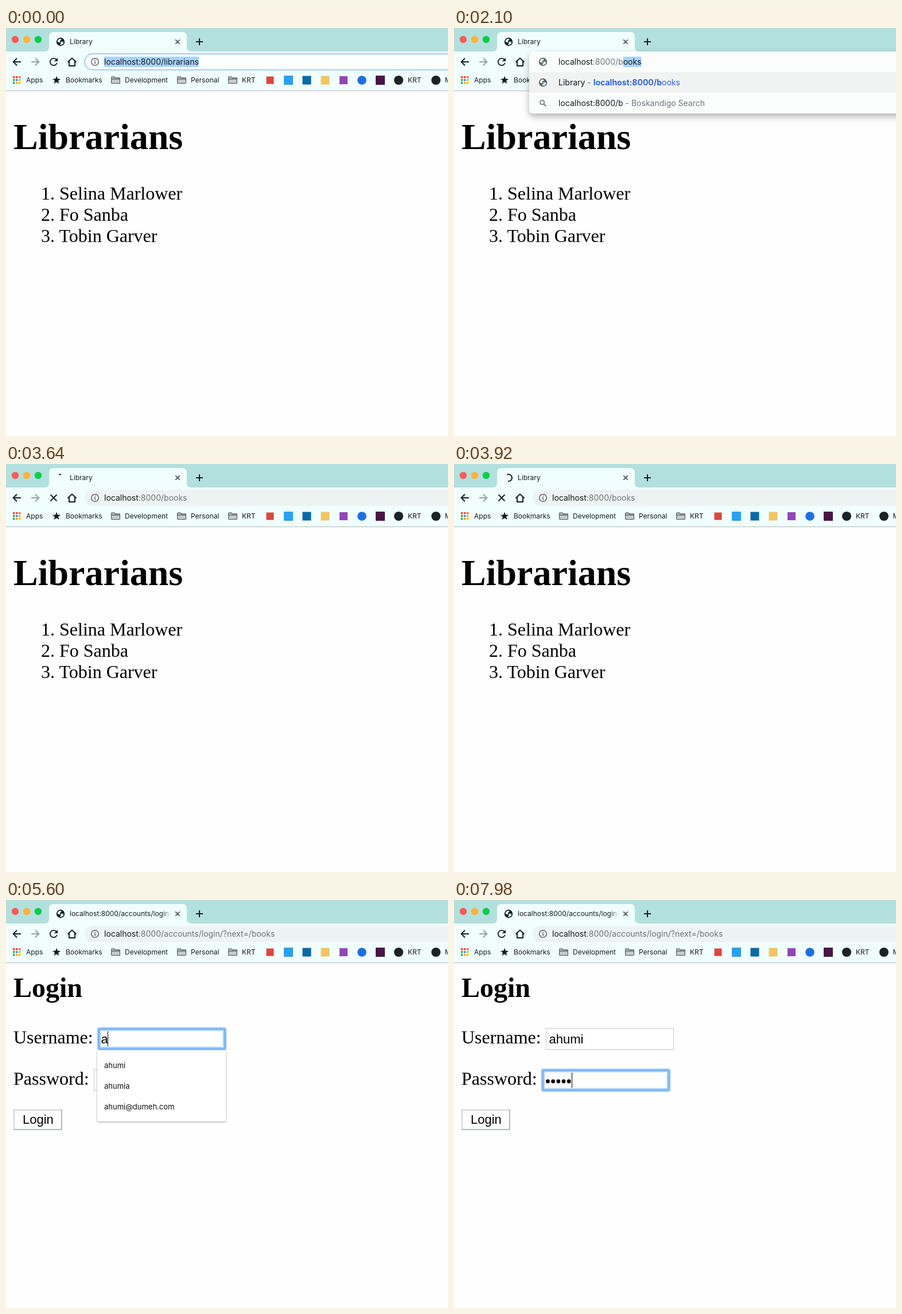
Write an HTML page that moves like this. It is 770 px wide and 711 px high and loops after 8 s.

```html
<!DOCTYPE html>
<html lang="en">
<head>
<meta charset="utf-8">
<title>Library</title>
<style>
  html, body { margin: 0; width: 100%; height: 100%; overflow: hidden; background: #fefefe; }
  svg { display: block; width: 770px; height: 711px; }
  text { white-space: pre; font-family: Inter, Roboto, sans-serif; font-size: 14px; fill: #111a1c; }
  .small { font-size: 12px; }
  .list { font: 32px "Liberation Serif", serif; fill: #000; }
  .head { font: bold 64px "Liberation Serif", serif; fill: #000; }
  .form { font: 22px "Liberation Sans", sans-serif; fill: #000; }
  .hint { font-size: 13px; fill: #111; }
  .dim { fill: #6c7478; }
  .link { fill: #2c64e0; }
  .bold { font-weight: 700; }
  .menu { filter: drop-shadow(0 5px 6px rgba(0, 0, 0, .3)); }
  .popup { filter: drop-shadow(0 1px 1.5px rgba(0, 0, 0, .4)); }
</style>
</head>
<body>
<svg viewBox="0 0 770 711">
  <defs>
    <linearGradient id="fade">
      <stop offset="0" stop-color="#f0fffe" stop-opacity="0"/>
      <stop offset="1" stop-color="#f0fffe"/>
    </linearGradient>
    <clipPath id="tabClip"><rect x="108" y="8" width="178" height="30"/></clipPath>
    <g id="globe">
      <circle r="7.2"/>
      <path d="M-5.4 -.6C-5 -3.4 -2.8 -5.2 -.4 -5.4L1.8 -4.6L.6 -2.4L-1.6 -1.6L-.6 .4L-2.6 1.6ZM.4 .6L3 -.6L5.4 .8C5 3.4 3 5 .6 5.4L-1.4 4L.8 2.6Z" fill="#f4fdfd"/>
    </g>
    <path id="arrow" d="M7 0H-6M0-6.3L-6.3 0L0 6.3" fill="none" stroke-width="2"/>
    <path id="reload" transform="scale(.88) translate(-12 -12)" d="M17.65 6.35C16.2 4.9 14.21 4 12 4c-4.42 0-7.99 3.58-7.99 8s3.57 8 7.99 8c3.73 0 6.84-2.55 7.73-6h-2.08c-.82 2.33-3.04 4-5.65 4-3.31 0-6-2.69-6-6s2.69-6 6-6c1.66 0 3.14.69 4.22 1.78L13 11h7V4l-2.35 2.35z"/>
    <path id="folder" d="M.6 1.6Q.6.6 1.6.6H5.8L7.4 2.4H14.4Q15.4 2.4 15.4 3.4V11Q15.4 12 14.4 12H1.6Q.6 12 .6 11ZM.6 4.4H15.4" fill="#c5caca" stroke="#4c5456" stroke-width="1.1"/>
  </defs>
  <g id="chrome"></g>
  <g id="live"></g>
</svg>
<script>
const LOOP = 8000;
const HOST = "localhost", PORT = ":8000/", WORD = "books";
const USER = "ahumi";
const INK = "#0b2226";
const SELECT = "#a9d3fd";

const rect = (x, y, w, h, fill, more = "") =>
  `<rect x="${x}" y="${y}" width="${w}" height="${h}" fill="${fill}" ${more}/>`;
const circle = (x, y, r, fill, more = "") =>
  `<circle cx="${x}" cy="${y}" r="${r}" fill="${fill}" ${more}/>`;
const line = (d, color, width) =>
  `<path d="${d}" fill="none" stroke="${color}" stroke-width="${width}"/>`;
const text = (x, y, body, cls = "") => `<text x="${x}" y="${y}" class="${cls}">${body}</text>`;
const span = (body, cls) => `<tspan class="${cls}">${body}</tspan>`;
const icon = (id, x, y, color, more = "") =>
  `<use href="#${id}" transform="translate(${x} ${y}) ${more}" fill="${color}" stroke="${id === "arrow" ? color : "none"}"/>`;
const folder = x => `<use href="#folder" x="${x}" y="84.5"/>`;
const cross = (x, y, r, color, width) =>
  line(`M${x - r} ${y - r}l${2 * r} ${2 * r}m0 ${-2 * r}l${-2 * r} ${2 * r}`, color, width);
const caret = (x, y, h) => rect(Math.floor(x), y, 1, h, "#000");

const pen = document.createElement("canvas").getContext("2d");
const width = (body, font = "14px Inter, Roboto, sans-serif") => {
  pen.font = font;
  return pen.measureText(body).width;
};
const formWidth = body => width(body, '22px "Liberation Sans", sans-serif');

// Latest value whose start time has passed.
const at = (t, keys) => keys.filter(k => k[0] <= t).pop()[1];

function star(x, y, r) {
  const points = Array.from({ length: 10 }, (_, i) => {
    const a = i * Math.PI / 5 - Math.PI / 2, d = i % 2 ? r * .42 : r;
    return `${(x + d * Math.cos(a)).toFixed(2)},${(y + d * Math.sin(a)).toFixed(2)}`;
  });
  return `<polygon points="${points.join(" ")}" fill="${INK}"/>`;
}

function drawChrome() {
  let s = rect(0, 0, 770, 41, "#b2e0de") + rect(0, 41, 770, 69, "#f0fffe");
  s += rect(0, 109, 770, 1, "#b1b9b9");
  s += `<path d="M67 41Q75 41 75 33V15Q75 7 83 7H307Q315 7 315 15V33Q315 41 323 41Z" fill="#f0fffe"/>`;
  ["#fc5b57", "#fcb43a", "#0fcb4a"].forEach((c, i) => s += circle(16 + 20 * i, 20, 6.2, c));
  s += cross(299, 24, 3.8, "#3a4648", 1.6);
  s += line("M331 24h12M337 18v12", INK, 2);
  s += icon("arrow", 19, 59, INK) + icon("arrow", 51, 59, "#93a0a1", "scale(-1 1)");
  s += line("M107.5 59.5L115 52.5L122.5 59.5M110 58V66H120V58", INK, 2);

  const dots = ["#ea4335", "#ea4335", "#ee6a35", "#34a853", "#4285f4", "#fbbc05", "#34a853", "#f4a623", "#fbbc05"];
  dots.forEach((c, i) => s += rect(12 + i % 3 * 5, 84 + Math.floor(i / 3) * 5, 3.4, 3.4, c));
  s += star(88, 91, 7.5);
  [183, 298, 387].forEach(x => s += folder(x));
  [[35, "Apps"], [104, "Bookmarks"], [207, "Development"], [322, "Personal"], [411, "KRT"], [700, "KRT"], [764.5, "M"]]
    .forEach(([x, label]) => s += text(x, 95, label, "small"));
  [[460, 13, "#d8483e"], [492, 16, "#2aa1ee"], [524, 15, "#0b69a8"], [556, 15, "#efc565"], [588, 14, "#9146b5"], [652, 16, "#4a1548"]]
    .forEach(([x, size, c]) => s += rect(x - size / 2, 91 - size / 2, size, size, c));
  s += circle(620, 91, 7.8, "#1f6fe0") + circle(684, 91, 8, "#1a2326") + circle(749, 91, 8, "#1a2326");
  return s;
}

function drawTab(t) {
  const spin = at(t, [[0, 0], [3640, 9], [3780, 35], [3920, 60], [4060, 72], [4200, 0]]);
  const title = t < 4060 ? "Library" : "localhost:8000/accounts/login/?next=/books";
  let s = `<g clip-path="url(#tabClip)">${text(111, 28, title, "small")}</g>`;
  s += rect(273, 10, 14, 28, "url(#fade)");
  s += spin
    ? circle(95, 24, 6, "none", `stroke="${INK}" stroke-width="2" pathLength="100" stroke-dasharray="${spin} 100" transform="rotate(-116 95 24)"`) + cross(83, 59, 5.5, INK, 2)
    : icon("globe", 95, 24, INK) + icon("reload", 83, 59, INK);
  return s;
}

const info = () => circle(155, 59, 6.3, "none", 'stroke="#5c686a" stroke-width="1.5"')
  + rect(154.2, 58, 1.6, 4.4, "#5c686a") + rect(154.2, 55.2, 1.6, 1.7, "#5c686a");

function drawEditing(t) {
  const path = "librarians", x = 171;
  const mid = x + width(HOST + PORT), end = mid + width(path);
  let s = rect(137, 45, 700, 28, "#fbffff", 'rx="14" stroke="#a9cbf6" stroke-width="2"') + info();
  if (t < 840) {
    s += rect(x, 50, end - x, 18, SELECT) + text(x, 64, HOST + PORT + path);
  } else if (t < 1260) {
    s += text(x, 64, HOST + span(PORT + path, "dim")) + caret(end, 50, 18);
  } else {
    s += rect(mid, 50, end - mid, 18, SELECT);
    s += text(x, 64, HOST + span(PORT, "dim") + path);
  }
  return s;
}

function drawMenu(t) {
  const typed = at(t, [[2100, 1], [2240, 2], [2380, 3], [2520, 4], [2800, 5]]);
  const listed = t < 2800 ? typed : at(t, [[2800, 4], [2940, 5]]);
  const cut = n => [WORD.slice(0, n), WORD.slice(n)];
  const [done, rest] = cut(typed), [match, tail] = cut(listed);
  const x = 182, edge = x + width(HOST + PORT + done);
  let s = `<g class="menu">${rect(131, 41, 700, 108, "#fbfdfd", 'rx="7"')}</g>`;
  s += rect(131, 77, 639, 36, "#f1f2f2");
  s += icon("globe", 155, 59, "#5f6669") + icon("globe", 155, 95, "#5f6669");
  s += circle(153.6, 129.6, 3.7, "none", 'stroke="#5f6669" stroke-width="1.5"')
    + line("M156.3 132.3l4.2 4.2", "#5f6669", 1.7);
  if (rest) s += rect(edge, 50, width(rest), 18, SELECT);
  s += text(x, 64, HOST + span(PORT + done, "dim") + rest);
  if (!rest && t < 3360) s += caret(edge, 50, 18);
  s += text(x, 100, "Library" + span(" - ", "dim") + span(HOST + PORT + match, "link bold") + span(tail, "link"));
  s += text(x, 136, HOST + PORT + match + span(" - Boskandigo Search", "dim"));
  return s;
}

function drawIdle(t) {
  const path = t < 4060 ? WORD : "accounts/login/?next=/books";
  return rect(137, 45, 700, 28, "#edf3f3", 'rx="14"') + info()
    + text(171, 64, HOST + span(PORT + path, "dim"));
}

function drawList() {
  const names = ["Selina Marlower", "Fo Sanba", "Tobin Garver"];
  return text(13, 211, "Librarians", "head")
    + names.map((name, i) => text(61, 299 + 37 * i, `${i + 1}. ${name}`, "list")).join("");
}

function field(x, y, focus) {
  if (!focus) return rect(x + .5, y + .5, 222, 37, "#fff", 'stroke="#c6c9c9"');
  const ring = (d, color, w, r) =>
    rect(x + d, y + d, 223 - 2 * d, 38 - 2 * d, "none", `rx="${r}" stroke="${color}" stroke-width="${w}"`);
  return rect(x, y, 223, 38, "#fff") + ring(-.8, "#c3ddfa", 2, 4) + ring(4.8, "#cfe4fc", 2, 1)
    + ring(2, "#86bcf8", 4, 2) + ring(.5, "#72aaea", 1, 2);
}

function drawLogin(t) {
  const onPass = t >= 6720;
  const name = USER.slice(0, at(t, [[0, 0], [5460, 1], [5880, 2], [6020, 3], [6160, 5]]));
  const dots = at(t, [[0, 0], [7420, 1], [7700, 2], [7840, 3], [7980, 5]]);
  const blinkOff = (t >= 4480 && t < 4900) || (t >= 7140 && t < 7420);

  let s = `<text x="13" y="169" class="head" style="font-size:48px">Login</text>`;
  s += text(13, 250, "Username:", "list") + text(13, 322, "Password:", "list");
  s += field(160, 223, !onPass) + field(153, 295, onPass);
  s += text(165.5, 250, name, "form");
  for (let i = 0; i < dots; i++) s += circle(163.4 + 9.2 * i, 316, 3.4, "#000");
  if (!blinkOff) {
    s += onPass ? caret(159 + 9.2 * dots, 301, 26)
      : caret(name ? 165.5 + formWidth(name) : 166, 229, 26);
  }
  s += rect(14, 366, 83, 34, "#fff", 'stroke="#d3d6d6" stroke-width="2"');
  s += line("M13 400H97V365", "#b3b8b8", 2) + text(29, 390, "Login", "form");
  if (t >= 5600 && !onPass) {
    s += `<g class="popup"><path d="M159 262H383V383Q383 386 380 386H162Q159 386 159 383Z" fill="#fff"/></g>`;
    [USER, USER + "a", USER + "@dumeh.com"].forEach((hint, i) => s += text(171, 293 + 36 * i, hint, "hint"));
  }
  return s;
}

function draw(t) {
  const page = t < 4060 ? drawList() : drawLogin(t);
  const bar = t < 2100 ? drawEditing(t) : t < 3640 ? drawMenu(t) : drawIdle(t);
  return page + drawTab(t) + bar;
}

document.getElementById("chrome").innerHTML = drawChrome();
const live = document.getElementById("live");
const start = performance.now();
let shown = "";

function tick() {
  const next = draw((performance.now() - start) % LOOP);
  if (next !== shown) live.innerHTML = shown = next;
  requestAnimationFrame(tick);
}
tick();
</script>
</body>
</html>
```
